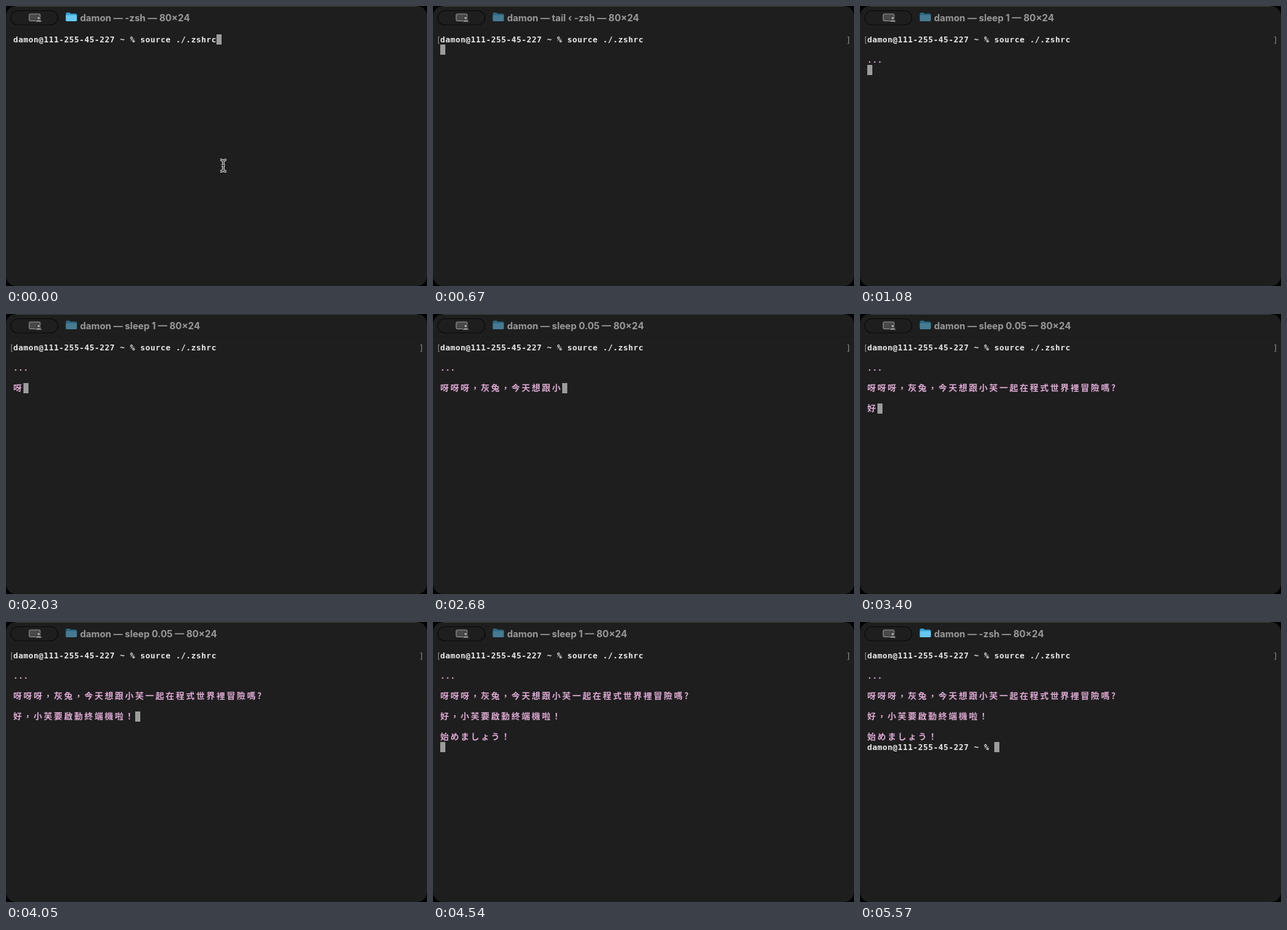
Animation, 580 px wide and 385 px high, one loop 5.82 s. Source, as an HTML page:

```html
<!DOCTYPE html>
<html lang="zh-Hant">
<head>
<meta charset="utf-8">
<title>Terminal</title>
<style>
  html, body { margin: 0; width: 100%; height: 100%; overflow: hidden; background: #000; }
  svg { display: block; }
  text { white-space: pre; }
  .title { font: 700 12.8px Inter, sans-serif; fill: #9a9a9a; }
  .mono { font: 700 11px "DejaVu Sans Mono", monospace; fill: #ececec; }
  .thin { font-weight: 400; fill: #8c8c8c; }
  .cjk { font: 600 11.8px "Noto Sans CJK TC", "Noto Sans CJK", "Noto Sans CJK JP", sans-serif; }
  .pink { fill: #dda9d3; }
</style>
</head>
<body>
<svg width="580" height="385" viewBox="0 0 580 385">
  <rect width="580" height="385" rx="14" fill="#1e1e1e"/>
  <path d="M14 .5H566" stroke="#383838"/>
  <path d="M0 31.5H580" stroke="#1a1a1a"/>

  <rect x="6.5" y="6.5" width="65" height="19.5" rx="9.75" fill="#1e1e1e" stroke="#0b0b0b" stroke-width="1.2"/>
  <rect x="32" y="11" width="15" height="9.5" rx="1.5" fill="#484848" stroke="#929292" stroke-width="1.1"/>
  <g fill="#a2a2a2" stroke="#1e1e1e" stroke-width=".8">
    <path d="M40.500 22Q41 18.800 45 18.800T49.500 22Z"/>
    <circle cx="45" cy="16.500" r="2.3"/>
  </g>

  <g id="folder">
    <path d="M82.500 10.500Q82.500 9 84 9H87.500L89 10.500H96Q97.500 10.500 97.500 12V19.500Q97.500 21 96 21H84Q82.500 21 82.500 19.500Z" fill="#35a3d6"/>
    <path d="M82.500 12.500H97.500V19.500Q97.500 21 96 21H84Q82.500 21 82.500 19.500Z" fill="#66c8f1"/>
  </g>
  <text class="title" x="102" y="21">damon</text>
  <text class="title" x="148" y="21" id="title"></text>

  <g id="brackets">
    <text class="mono thin" x="4.500" y="50">[</text>
    <text class="mono thin" x="569" y="50">]</text>
  </g>
  <rect id="caret" width="7" height="14" fill="#9c9c9c"/>
  <g id="screen"></g>

  <g id="pointer" fill="none">
    <path id="beam" d="M295 211.500Q299.300 211.500 299.300 214.500V224.500Q299.300 227.500 295 227.500M303.600 211.500Q299.300 211.500 299.300 214.500M299.300 224.500Q299.300 227.500 303.600 227.500M297 219.500H301.600"/>
    <use href="#beam" stroke="#dedede" stroke-width="3.2"/>
    <use href="#beam" stroke="#202020" stroke-width="1.1"/>
  </g>
</svg>
<script>
const LOOP = 5820, CELL = 7, ROW = 14, LEFT = 10, TOP = 39;
const PROMPT = "damon@111-255-45-227 ~ % ";
const SAY = [
  "呀呀呀，灰兔，今天想跟小芙一起在程式世界裡冒險嗎?",
  "好，小芙要啟動終端機啦！",
  "始めましょう！"
];
const TITLES = [
  [0, "-zsh"], [240, "tail ‹ -zsh"], [410, "mkdir ‹ -zsh"], [670, "tail ‹ -zsh"],
  [840, "path_helper -s ‹ -zsh"], [920, "sleep 0.05"], [1080, "sleep 1"],
  [2110, "sleep 0.05"], [4540, "sleep 1"], [5570, "-zsh"]
];
const $ = id => document.getElementById(id);

function addLine(row, cls, cells) {
  const el = document.createElementNS("http://www.w3.org/2000/svg", "text");
  el.setAttribute("class", cls);
  el.setAttribute("y", TOP + row * ROW + 11);
  el.setAttribute("x", Array.from({ length: 41 }, (_, i) => LEFT + i * cells * CELL).join(" "));
  $("screen").append(el);
  return el;
}

const command = addLine(0, "mono", 1);
const dots = addLine(2, "mono pink", 1);
const says = [4, 6, 8].map(row => addLine(row, "cjk pink", 2));
const prompt = addLine(9, "mono", 1);
command.textContent = PROMPT + "source ./.zshrc";

function put(el, text) {
  if (el.textContent !== text) el.textContent = text;
}

function show(el, on) {
  el.style.visibility = on ? "visible" : "hidden";
}

function render(t) {
  const title = TITLES.filter(([at]) => at <= t).pop()[1];
  put($("title"), `— ${title} — 80×24`);
  $("folder").style.opacity = title === "-zsh" ? 1 : 0.55;
  show($("brackets"), t >= 80);
  show($("pointer"), t < 160);

  let row = 0, col = 40;
  if (t >= 80) { row = 1; col = 0; }

  const dotCount = t < 920 ? 0 : t < 1000 ? 2 : 3;
  put(dots, ".".repeat(dotCount));
  if (dotCount) { row = 2; col = dotCount; }
  if (t >= 1080) { row = 3; col = 0; }

  // The screen refreshes about every 81 ms while characters arrive faster.
  const tick = Math.floor((t - 2022) / 80.9);
  [0, 17, 25.7].forEach((start, i) => {
    const typed = Math.floor((tick - start) * 1.48) + 1;
    const count = Math.max(0, Math.min(SAY[i].length, typed));
    put(says[i], SAY[i].slice(0, count));
    if (count) { row = 4 + 2 * i; col = 2 * count; }
  });

  const done = t >= 5570;
  put(prompt, done ? PROMPT : "");
  if (t >= 4540) { row = 9; col = done ? PROMPT.length : 0; }

  $("caret").setAttribute("x", LEFT + col * CELL);
  $("caret").setAttribute("y", TOP + row * ROW);
}

const begin = performance.now();
function frame() {
  render((performance.now() - begin) % LOOP);
  requestAnimationFrame(frame);
}
frame();
</script>
</body>
</html>
```
